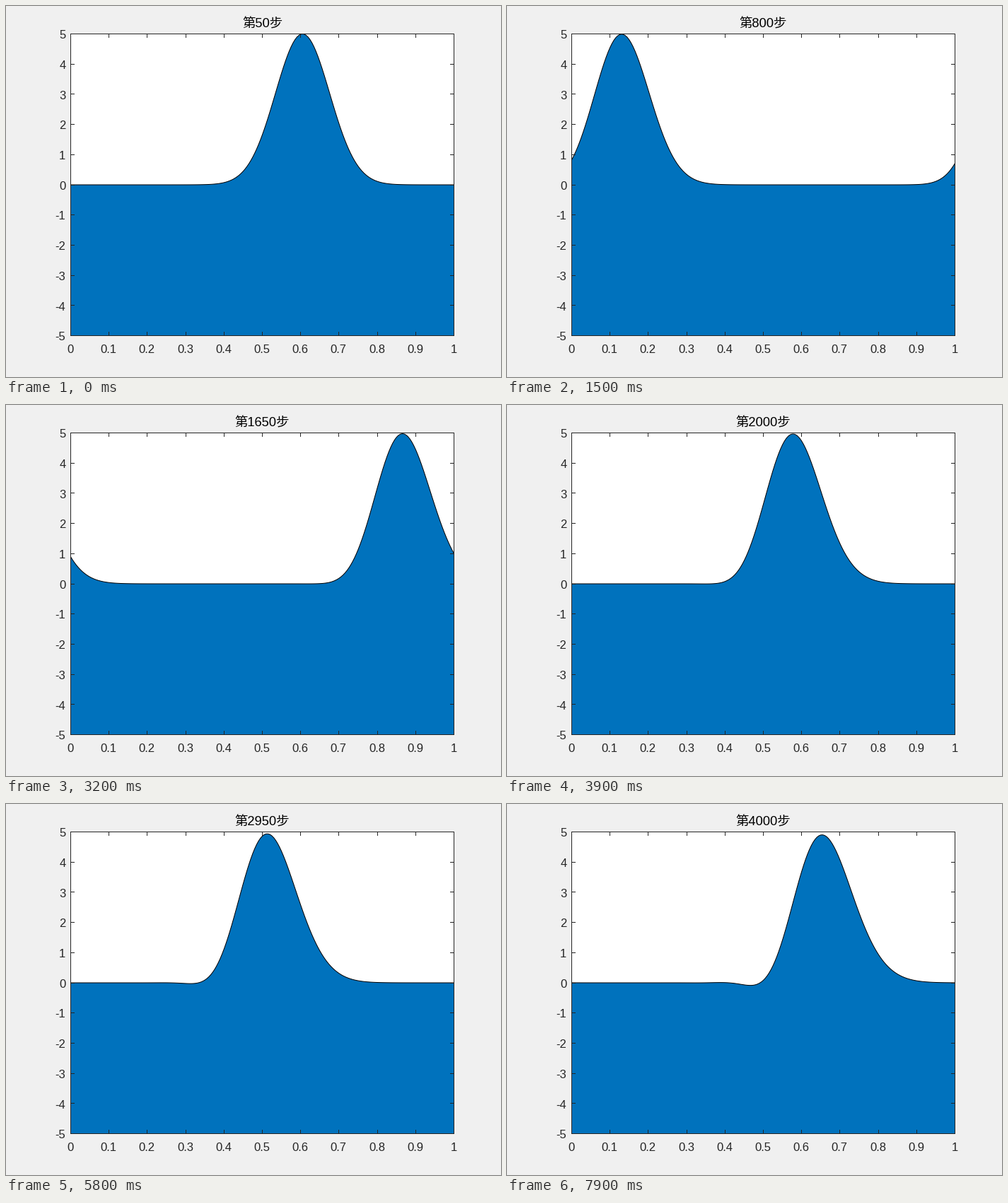
These frames come from a looping animation (700 by 525 pixels, 8 s). A matplotlib script:

```python
import numpy as np
import matplotlib.pyplot as plt
from matplotlib.animation import FuncAnimation
from matplotlib.patches import Polygon, Rectangle

W, H, DPI = 700, 525, 100
PX = 72 / DPI
FRAMES, INTERVAL, STRIDE = 80, 100, 50

LEFT, RIGHT, TOP, BOTTOM = 91.5, 633.5, 39.5, 466.5
TICK = 5.5
INK = "#262626"

COURANT = 0.4103
x = np.linspace(0, 1, 201)


def advect():
    """Lax-Wendroff transport of a Gaussian pulse on a periodic grid."""
    u = 5 * np.exp(-100 * (x - 0.5025) ** 2)
    states = []
    for step in range(1, FRAMES * STRIDE + 1):
        ahead, behind = np.roll(u, -1), np.roll(u, 1)
        u = (u - COURANT / 2 * (ahead - behind)
             + COURANT**2 / 2 * (ahead - 2 * u + behind))
        if step % STRIDE == 0:
            states.append(u)
    return states


def to_x(v):
    return LEFT + v * (RIGHT - LEFT)


def to_y(v):
    return BOTTOM - (v + 5) / 10 * (BOTTOM - TOP)


plt.rcParams["font.family"] = ["Liberation Sans", "Noto Sans CJK JP"]
plt.rcParams["path.snap"] = False
fig = plt.figure(figsize=(W / DPI, H / DPI), dpi=DPI, facecolor="#f0f0f0")
ax = fig.add_axes([0, 0, 1, 1])
ax.set(xlim=(0, W), ylim=(H, 0))
ax.axis("off")


def box(**style):
    ax.add_patch(Rectangle((LEFT, TOP), RIGHT - LEFT, BOTTOM - TOP, **style))


def line(xs, ys):
    ax.plot(xs, ys, color=INK, lw=PX, zorder=4, solid_capstyle="butt")


def label(px, py, text, ha):
    ax.text(px, py, text, ha=ha, va="baseline", size=16.67 * PX, color=INK)


box(fc="white", ec="none", zorder=1)
box(fc="none", ec=INK, lw=PX, zorder=4)

for i in range(11):
    px, py = np.floor(to_x(i / 10)) + 0.5, np.floor(to_y(i - 5)) + 0.5
    line([px, px], [TOP, TOP + TICK])
    line([px, px], [BOTTOM, BOTTOM - TICK])
    line([LEFT, LEFT + TICK], [py, py])
    line([RIGHT, RIGHT - TICK], [py, py])
    label(px - 0.5, 491, f"{i / 10:g}", "center")
    label(84.5, to_y(i - 5) + 6.8, str(i - 5), "right")

area = ax.add_patch(Polygon([(0, 0)], closed=True, fc="#0072bd", ec="black",
                            lw=PX, joinstyle="round", zorder=2))
title = ax.text(362.5, 31, "", ha="center", va="baseline",
                size=18.33 * PX, color="black")
waves = advect()


def update(i):
    xs = np.r_[LEFT, to_x(x), RIGHT]
    ys = np.r_[BOTTOM, to_y(waves[i]), BOTTOM]
    area.set_xy(np.column_stack([xs, ys]))
    title.set_text(f"第{STRIDE * (i + 1)}步")
    return area, title


anim = FuncAnimation(fig, update, frames=FRAMES, interval=INTERVAL,
                     repeat=True, repeat_delay=0, blit=False)
plt.show()
```
